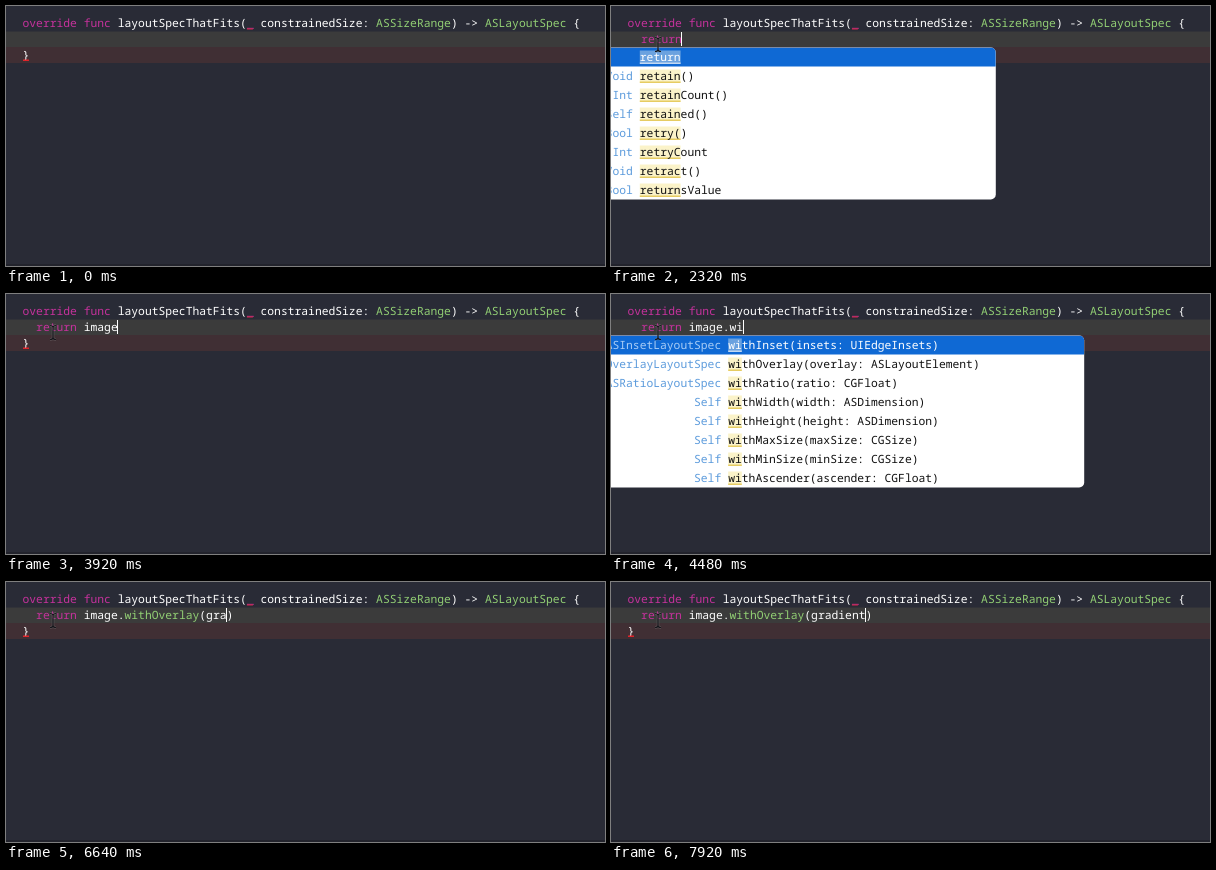
An HTML page with a canvas for the animation above (8 s loop, 599 px wide and 260 px high).

```html
<!DOCTYPE html>
<html lang="en">
<head>
<meta charset="utf-8">
<title>Code completion</title>
<style>
  html, body { margin: 0; width: 599px; height: 260px; overflow: hidden; background: #292b36; }
  canvas { display: block; }
</style>
</head>
<body>
<canvas id="stage" width="599" height="260"></canvas>
<script>
const ctx = document.getElementById('stage').getContext('2d');
const LOOP = 8000, TICK = 80;
const LEFT = 16.5, CHAR = 6.8, ROW = 19, POPUP_TOP = 41.5;
const WHITE = '#ffffff', PINK = '#c5329c', GREEN = '#92cf74';
const column = n => LEFT + n * CHAR;

// Completion lists: the column they align to, and rows of "type|name".
const lists = {
  ret: { col: 2, rows: ['|return', 'Void|retain()', 'Int|retainCount()', 'Self|retained()',
    'Bool|retry()', 'Int|retryCount', 'Void|retract()', 'Bool|returnsValue'] },
  ima: { col: 9, rows: ['ASImageNode|image', 'CGSize|imageSize', 'UIImage|imageNamed(name: String)',
    'CGFloat|imageScale', 'CGRect|imageFrame', 'Bool|imageLoaded', 'Void|imageReset()', 'Self|imageCopy()'] },
  dot: { col: 15, rows: ['CGFloat|alpha', 'CGRect|bounds', 'CGRect|frame', 'Bool|isHidden',
    'ASLayoutElementStyle|style', 'Void|setNeedsLayout()', 'Self|withWidth(width: ASDimension)',
    'Self|withHeight(height: ASDimension)'] },
  with: { col: 15, rows: ['ASInsetLayoutSpec|withInset(insets: UIEdgeInsets)',
    'ASOverlayLayoutSpec|withOverlay(overlay: ASLayoutElement)', 'ASRatioLayoutSpec|withRatio(ratio: CGFloat)',
    'Self|withWidth(width: ASDimension)', 'Self|withHeight(height: ASDimension)',
    'Self|withMaxSize(maxSize: CGSize)', 'Self|withMinSize(minSize: CGSize)',
    'Self|withAscender(ascender: CGFloat)'] },
  grad: { col: 27, rows: ['ASDisplayNode|gradient', 'CGSize|gradientSize', 'CGFloat|gradientAngle',
    'UIColor|gradientColor', 'CGRect|gradientFrame', 'Bool|gradientVisible',
    'Void|gradientReset()', 'Self|gradientCopy()'] }
};

// [time, text before the caret, list, selected row]
const call = 'return image.withOverlay(';
const steps = [
  [0, ''], [1680, 'r'], [1840, 're'], [2000, 'ret'], [2080, 'ret', 'ret'], [2160, 'retu', 'ret'],
  [2240, 'retur', 'ret'], [2320, 'return', 'ret'], [2480, 'return '], [3040, 'return i'],
  [3280, 'return im'], [3520, 'return ima'], [3600, 'return ima', 'ima'], [3680, 'return imag', 'ima'],
  [3920, 'return image'], [4240, 'return image.'], [4320, 'return image.', 'dot'],
  [4480, 'return image.wi', 'with'], [4560, 'return image.wit', 'with'],
  [4720, 'return image.with', 'with'], [5360, 'return image.with', 'with', 1],
  [5600, call], [6080, call + 'g'], [6400, call + 'gr'], [6640, call + 'gra'],
  [6880, call + 'grad', 'grad'], [7040, call + 'gradi', 'grad'], [7120, call + 'gradie', 'grad'],
  [7200, call + 'gradien', 'grad'], [7280, call + 'gradient', 'grad'], [7840, call + 'gradient']
];

function rect(x, y, w, h, color) {
  ctx.fillStyle = color;
  ctx.fillRect(x, y, w, h);
}

function rounded(x, y, w, h, r, color) {
  ctx.fillStyle = color;
  ctx.beginPath();
  ctx.roundRect(x, y, w, h, r);
  ctx.fill();
}

function text(str, x, y, color, align = 'left') {
  ctx.textAlign = align;
  ctx.fillStyle = color;
  ctx.fillText(str, x, y);
}

function codeLine(str, col, y) {
  for (const word of str.match(/\w+|[^\w]+/g) || []) {
    const color = /^(override|func|return|_)$/.test(word) ? PINK
      : /^(AS\w+|withOverlay)$/.test(word) ? GREEN : WHITE;
    text(word, column(col), y, color);
    col += word.length;
  }
}

function popup({ col, rows }, typed, selected, shadow) {
  const x = column(col) - 1.3, right = x + 356, height = rows.length * ROW;
  ctx.save();
  if (shadow) {
    ctx.shadowColor = 'rgba(0,0,0,.35)';
    ctx.shadowBlur = 14;
    ctx.shadowOffsetY = 5;
  }
  rounded(-30, POPUP_TOP, right + 30, height, 5, WHITE);
  ctx.restore();

  ctx.save();
  ctx.beginPath();
  ctx.roundRect(-30, POPUP_TOP, right + 30, height, 5);
  ctx.clip();
  rows.forEach((row, i) => {
    const [type, name] = row.split('|');
    const y = POPUP_TOP + i * ROW, active = i === selected;
    const match = col + typed <= 0 ? 0 : typed * CHAR;
    if (active) rect(-30, y, right + 30, ROW, '#0f69d4');
    rect(x, y + 3, match, 13, active ? '#6ba2df' : '#fbf3c9');
    rect(x, y + 15, match, 1.5, active ? '#c3d9f2' : '#e6cc62');
    text(type, x - 7, y + 13.5, active ? '#a9cdf6' : '#5c9bdc', 'right');
    text(name, x, y + 13.5, active ? WHITE : '#111111');
  });
  ctx.restore();
}

function pointer(t) {
  if (t < 160) return;
  const p = Math.min(1, (t - 160) / 640), rest = (1 - p) ** 2;
  const x = 47 + 431 * rest, y = 38.5 + 100 * rest;
  const beam = new Path2D(`M${x - 3} ${y - 7}q3 0 3 2v10q0 2 -3 2m6 0q-3 0 -3 -2v-10q0 -2 3 -2`);
  ctx.strokeStyle = 'rgba(150,150,150,.35)';
  ctx.lineWidth = 2.6;
  ctx.stroke(beam);
  ctx.strokeStyle = '#15161b';
  ctx.lineWidth = 1.2;
  ctx.stroke(beam);
}

function caretVisible(t) {
  const on = (from, to) => t >= from && t < to;
  return on(240, 800) || on(1360, 2960) || on(3040, 5200) || on(5360, 5600) || t >= 6080;
}

function draw(t) {
  const [, typed, list, selected = 0] = steps.findLast(step => step[0] <= t);
  const placeholder = t >= 5600 && t < 6080;
  const end = 2 + typed.length;

  rect(0, 0, 599, 260, '#292b36');
  rect(0, 258, 599, 2, '#22232c');
  if (t < 5600 || t >= 6400) rect(0, 25.5, 599, 15.5, '#3b3b3b');
  rect(0, 41, 599, 16, '#402f34');

  ctx.font = '500 11.333px "Noto Sans Mono", "DejaVu Sans Mono", monospace';
  ctx.textRendering = 'geometricPrecision';
  codeLine('override func layoutSpecThatFits(_ constrainedSize: ASSizeRange) -> ASLayoutSpec {', 0, 21);
  codeLine(typed, 2, 37);
  codeLine('}', 0, 53);
  rect(17, 53.5, 6, 1.5, '#e0242b');
  rect(column(33), 22.5, 6, 1, '#d82848');

  if (placeholder) {
    const label = 'overlay: ASLayoutElement';
    rounded(column(end) - 1.5, 25.5, label.length * CHAR + 3, 16, 4, '#3a7cc0');
    text(label, column(end), 37, '#0b0d12');
    text(')', column(end + label.length), 37, WHITE);
  } else if (t >= 5600) {
    text(')', column(end), 37, WHITE);
  }
  if (caretVisible(t)) rect(Math.floor(column(end)), 26, 1, 14, WHITE);
  if (list) popup(lists[list], end - lists[list].col, selected, t >= 4560 && t < 5600);
  pointer(t);
}

function frame(now) {
  draw(Math.floor(now % LOOP / TICK) * TICK);
  requestAnimationFrame(frame);
}
requestAnimationFrame(frame);
</script>
</body>
</html>
```
